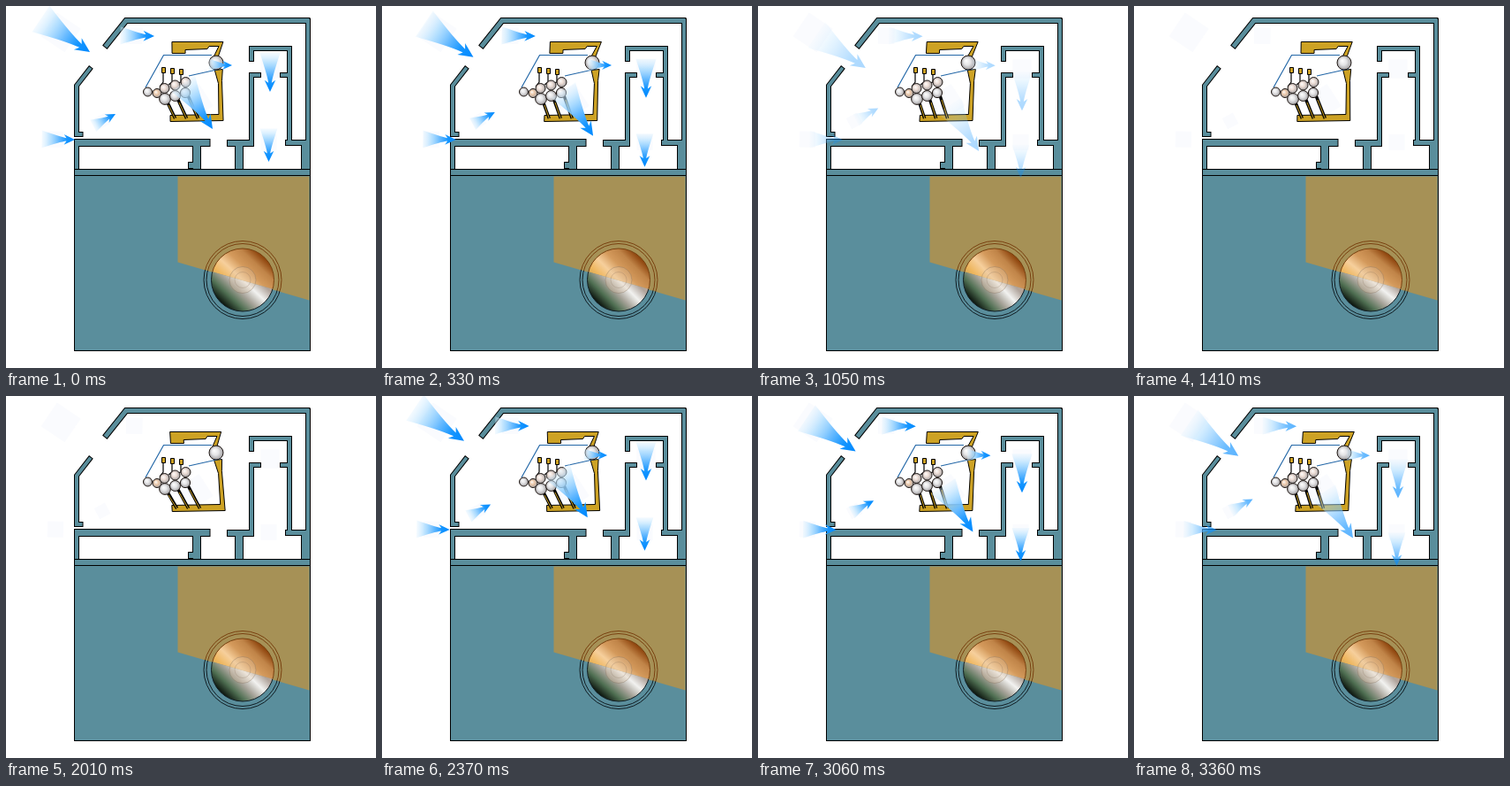
Write an HTML page with a canvas that moves like this. It is 419 px wide and 409 px high and loops after 3390 ms.

```html
<!DOCTYPE html>
<html>
<head>
<meta charset="utf-8">
<style>
html, body { margin: 0; width: 100%; height: 100%; overflow: hidden; background: #fff; }
canvas { display: block; }
</style>
</head>
<body>
<canvas id="stage" width="419" height="409"></canvas>
<script>
const ctx = document.getElementById('stage').getContext('2d');
const LOOP = 3390, CYCLE = 2450;
const STEEL = '#5a8e9c', TAN = '#a69156', GOLD = '#cda224', INK = '#000', WIRE = '#2468a8';
const rad = deg => deg * Math.PI / 180;
const clamp = x => Math.max(0, Math.min(1, x));

function trace(points) {
  ctx.beginPath();
  for (const [x, y] of points) ctx.lineTo(x, y);
}

function paint(fill, stroke, width = 1) {
  if (fill) { ctx.fillStyle = fill; ctx.fill(); }
  if (stroke) { ctx.strokeStyle = stroke; ctx.lineWidth = width; ctx.stroke(); }
}

function shape(points, fill, stroke = INK) {
  trace(points.map(([x, y]) => [x + .5, y + .5]));
  ctx.closePath();
  paint(fill, stroke);
}

function line(points, color, width) {
  trace(points);
  paint(null, color, width);
}

const box = (x, y, w, h, fill, stroke) =>
  shape([[x, y], [x + w, y], [x + w, y + h], [x, y + h]], fill, stroke);

function disc(x, y, r, fill, stroke) {
  ctx.beginPath();
  ctx.arc(x, y, r, 0, 7);
  paint(fill, stroke);
}

function gradient(g, colors) {
  colors.forEach((color, i) => g.addColorStop(i / (colors.length - 1), color));
  return g;
}

// Each wall: thickness, then the points of its centre line.
const walls = [
  [7, [114, 44], [136, 16.5], [341, 16.5]],               // hood
  [6, [342, 17], [342, 188]],                             // right side
  [8, [81, 188], [341, 188]],                             // base
  [9, [81.5, 154.5], [227, 154.5]],                       // left shelf
  [6, [84.5, 145], [80, 145], [80, 90], [94.6, 71.2]],    // left side
  [6, [80, 158], [80, 188]],
  [10, [216, 160], [216, 184]],                           // posts
  [8, [210, 180], [214, 180]],
  [10, [264, 160], [264, 184]],
  [11, [339.5, 160], [339.5, 184]],
  [8, [254, 155], [277, 155]],                            // ledges
  [7, [319.5, 154.5], [340, 154.5]],
  [6, [278, 60], [278, 48], [321, 48], [321, 154]],       // chute
  [6, [286, 78], [278, 78], [278, 154]],
  [6, [313, 78], [321, 78]]
];

function drawHousing() {
  ctx.lineCap = 'square';
  for (const [width, ...points] of walls) line(points, INK, width);
  for (const [width, ...points] of walls) line(points, STEEL, width - 2);
  ctx.lineCap = 'butt';
  line([[77, 184.5], [345, 184.5]], INK, 1);
  box(77, 191, 267, 198, STEEL);
  shape([[194, 192], [343, 192], [343, 332], [194, 289]], TAN, null);
  box(77, 191, 267, 198, null);
}

// Brushed metal bands, listed from lower left to upper right.
const warm = ['#c09a48', '#c8a04a', '#eeb65e', '#f6cf9c', '#d49a5c', '#c08448', '#8a3f08'];
const cool = ['#0a120c', '#4f6f52', '#a8a49a', '#f2f2f0', '#b0a49c', '#c8a890', '#c8a890'];

function drawDial(t) {
  const x = 268, y = 309.5, r = 35.5;
  const angle = rad(-47 + 4 * Math.sin(t / 130));
  const dx = r * Math.cos(angle), dy = r * Math.sin(angle);
  for (const [edge, colors, rim] of [[200, warm, '#78400f'], [400, cool, '#101c22']]) {
    ctx.save();
    trace([[194, 289], [345, 332], [345, edge], [194, edge]]);
    ctx.clip();
    disc(x, y, 44, null, rim);
    disc(x, y, 41, null, rim);
    disc(x, y, r, gradient(ctx.createLinearGradient(x - dx, y - dy, x + dx, y + dy), colors), rim);
    ctx.restore();
  }
  disc(x, y, 15, 'rgba(225,200,170,.3)', 'rgba(130,110,90,.35)');
  disc(x, y, 9, null, 'rgba(130,110,90,.25)');
}

function drawRoller(x, y, r, tint = '#e4e4e6') {
  const g = ctx.createRadialGradient(x - r * .3, y - r * .3, 0, x, y, r);
  disc(x, y, r, gradient(g, ['#fff', tint, '#a2a0a2']), '#201814');
}

function drawPress(lean) {
  const skew = ([x, y]) => [x + (lean - .5) * (y - 86) * .125, y];
  shape([[188, 40], [246, 40], [239, 60], [235, 57], [241, 45], [230, 45], [228, 48],
    [203, 49], [203, 53], [188, 53]].map(skew), GOLD);
  shape([[236, 72], [240, 87], [240, 122], [185, 123], [185, 130], [245, 129],
    [244, 84], [245, 71]].map(skew), GOLD);

  line([[158, 92], [178.5, 55.5], [233, 55.5]], WIRE, 1.2);
  line([[243, 71], [207, 79]], WIRE, 1.2);
  for (let i = 0; i < 3; i++) {
    const x = 180 + 12 * i, top = 107 - 3 * i, foot = skew([191 + 13 * i, 127]);
    line([[x + 2, top], foot], INK, 3.5);
    line([[x + 4, top + 5], foot], GOLD, 1);
    const tab = 176 + 10 * i;
    line([[tab + 2, 76], [tab + 2, 86], [tab - 2, 91 - 2 * i]], INK, 1.2);
    box(tab, 69 + i, 4, 6, GOLD);
  }
  drawRoller(160.5, 97, 5);
  drawRoller(171, 98.5, 5, '#ecc8a8');
  for (let i = 0; i < 3; i++) {
    drawRoller(179.5 + 12 * i, 93 - 3.5 * i, 5.5, '#ecdcd4');
    drawRoller(180 + 11.5 * i, 105 - 3.5 * i, 6.4 - .4 * i);
  }
  drawRoller(238, 64, 8);
}

// tip x, tip y, angle, length
const arrows = [
  [95, 52, 34, 61], [168, 34, 1, 35], [124, 122, -28, 26], [78, 151, 1, 34],
  [256, 67, 1, 24], [234, 139, 57, 56], [299, 97, 90, 40], [297.5, 176, 90, 34]
];

function along([x, y, angle], distance, drawing) {
  ctx.save();
  ctx.translate(x, y);
  ctx.rotate(rad(angle));
  ctx.translate(distance, 0);
  drawing();
  ctx.restore();
}

function drawGhost(length) {
  const size = length * .53;
  ctx.fillStyle = '#fafbfe';
  ctx.fillRect(-length * .65 - size / 2, -size / 2, size, size);
}

function drawArrow(length) {
  const tail = length * 1.1, flare = length * .29, head = 6.5 + length * .14;
  const colors = ['rgba(222,241,255,.35)', 'rgba(165,218,255,.75)', '#6bbcff', '#1696ff', '#0088ff'];
  ctx.beginPath();
  ctx.moveTo(0, 0);
  for (const side of [-1, 1]) {
    const wing = [-head * 1.1, side * head * .52], neck = [-head * .85, side * head * .15];
    const end = [-tail, side * flare], bend = [-length * .5, side * flare * .3];
    if (side < 0) {
      ctx.lineTo(...wing);
      ctx.lineTo(...neck);
      ctx.quadraticCurveTo(...bend, ...end);
    } else {
      ctx.lineTo(...end);
      ctx.quadraticCurveTo(...bend, ...neck);
      ctx.lineTo(...wing);
    }
  }
  paint(gradient(ctx.createLinearGradient(-tail, 0, 0, 0), colors));
}

function draw(t) {
  const lean = ((1 + Math.cos(2 * Math.PI * (t - 2010) / CYCLE)) / 2) ** 1.5;
  const phase = t < 1700 ? t : t - CYCLE;
  ctx.fillStyle = '#fff';
  ctx.fillRect(0, 0, 419, 409);
  for (const arrow of arrows) along(arrow, 0, () => drawGhost(arrow[3]));
  drawHousing();
  drawDial(t);
  drawPress(lean);

  ctx.globalAlpha = Math.min(clamp((phase + 400) / 300), clamp((1200 - phase) / 450));
  for (const arrow of arrows)
    along(arrow, arrow[3] * .53 * phase / 1050, () => drawArrow(arrow[3]));
  ctx.globalAlpha = 1;
}

const start = performance.now();
function tick() {
  draw((performance.now() - start) % LOOP);
  requestAnimationFrame(tick);
}
tick();
</script>
</body>
</html>
```
